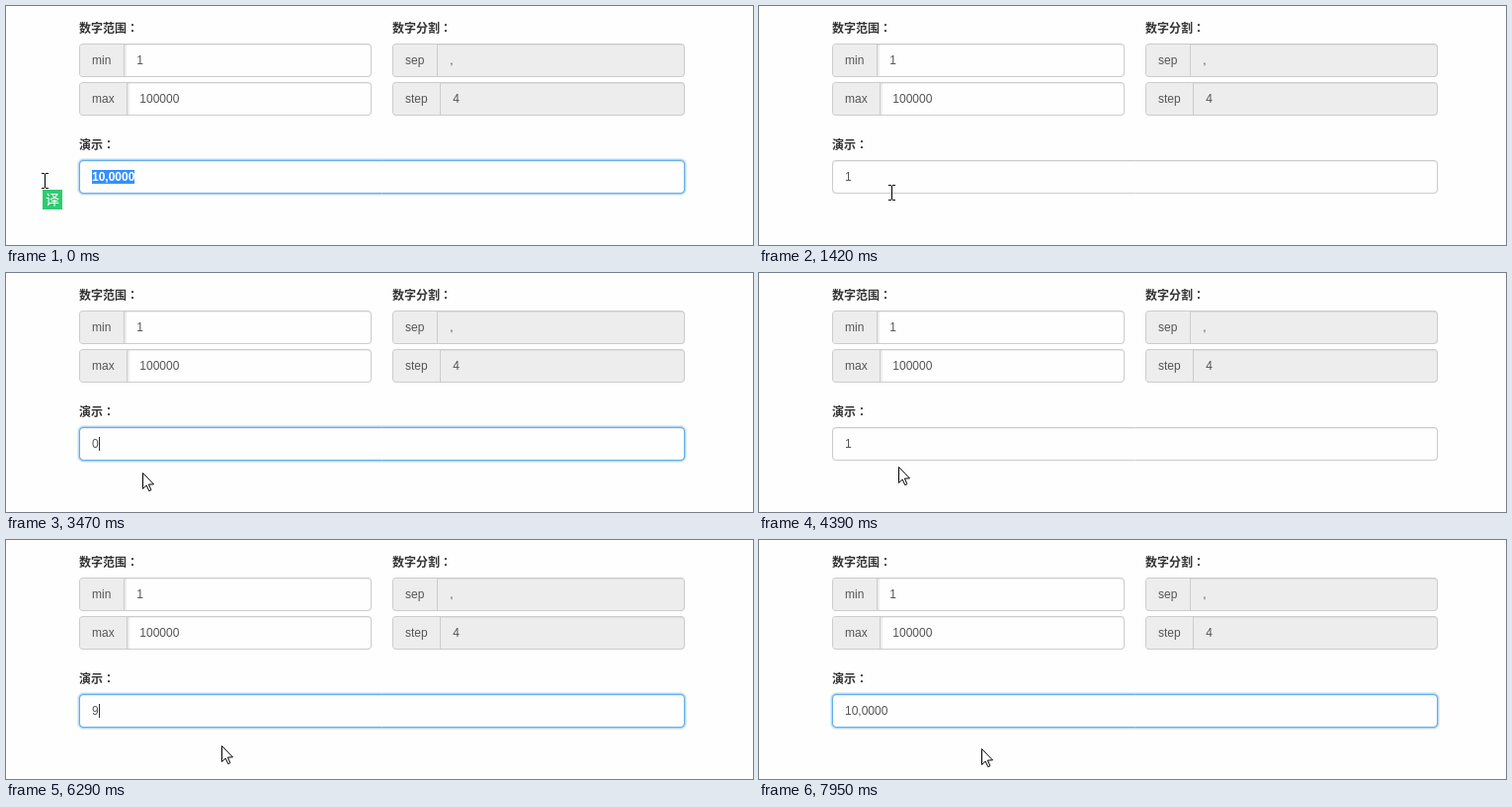
Write an HTML page with a canvas that moves like this. It is 756 px wide and 242 px high and loops after 8000 ms.

```html
<!DOCTYPE html>
<html lang="zh-CN">
<head>
<meta charset="utf-8">
<title>数字范围</title>
<style>
  html, body { margin: 0; width: 100%; height: 100%; overflow: hidden; background: #fefefe; }
  canvas { display: block; width: 756px; height: 242px; }
</style>
</head>
<body>
<canvas id="stage" width="756" height="242"></canvas>
<script>
const ctx = document.getElementById('stage').getContext('2d', { alpha: false });
const LOOP = 8000, TICK = 50, FADE = 110, BLINK = 530;
const MIN = 1, MAX = 100000, STEP = 4;
const SANS = '12px "Liberation Sans", Arial, sans-serif';
const CJK = '"Noto Sans CJK SC", "Noto Sans CJK", sans-serif';
const CJK_MID = '"Noto Sans CJK JP", "Noto Sans CJK", sans-serif';
const GREY = '#555', LINE = '#ccc', PANEL = '#ededed', PAPER = '#fefefe';
const FIELD = { x: 74, y: 156, w: 613, h: 34 };
const TEXT_X = 87;

// Pointer strokes: when each starts and ends, and where it leads
const strokes = [
  { from: 350, to: 630, x: 123, y: 200 },
  { from: 1300, to: 1620, x: 149, y: 174 },
  { from: 3350, to: 3470, x: 138, y: 202 },
  { from: 3530, to: 3530, x: 134, y: 205 },
  { from: 4390, to: 4530, x: 160, y: 167 },
  { from: 4830, to: 5000, x: 44, y: 168 },
  { from: 5430, to: 5540, x: 213, y: 203 },
  { from: 6290, to: 6290, x: 218, y: 208 },
  { from: 6940, to: 7000, x: 225, y: 211 }
];

// What the user does to the demo field
const actions = [
  [0, 'select'], [150, 'type', ''], [740, 'leave'],
  [1800, 'enter'], [2170, 'type', ''], [3040, 'type', '0'], [3720, 'leave'],
  [4830, 'enter'], [4940, 'select'], [5950, 'type', '9']
];
for (let i = 0; i < 6; i++) actions.push([6440 + 58 * i, 'type', '9'.repeat(3 + 2 * i)]);
actions.push([7950, 'leave']);

const clamp = (v, lo, hi) => Math.min(hi, Math.max(lo, v));

function format(value) {
  const digits = String(clamp(Number(value), MIN, MAX));
  return digits.replace(new RegExp(`\\B(?=(\\d{${STEP}})+$)`, 'g'), ',');
}

function fieldAt(t) {
  const s = { value: format(MAX), focused: true, turned: -LOOP, edited: 0, selected: false };
  for (const [at, action, value] of actions) {
    if (at > t) break;
    s.selected = action === 'select';
    s.edited = at;
    if (action === 'type') s.value = value;
    if (action === 'leave') s.value = format(s.value);
    if (action === 'leave' || action === 'enter') {
      s.focused = action === 'enter';
      s.turned = at;
    }
  }
  const p = clamp((t - s.turned) / FADE, 0, 1);
  s.ring = s.focused ? 1 - (1 - p) ** 2 : 1 - p * p;
  s.caret = s.focused && !s.selected && Math.floor((t - s.edited) / BLINK) % 2 === 0;
  return s;
}

function pointerAt(t) {
  let x = 39, y = 177;
  for (const s of strokes) {
    if (t < s.from) break;
    const n = Math.round((s.to - s.from) / TICK) + 1;
    const span = (s.to - s.from) / (n - 1) || 1;
    const part = Math.min(1, (1 + Math.floor((t - s.from) / span)) / n);
    x += (s.x - x) * part;
    y += (s.y - y) * part;
  }
  return [Math.round(x), Math.round(y)];
}

function text(str, x, y, color = GREY, font = SANS) {
  ctx.font = font;
  ctx.fillStyle = color;
  ctx.fillText(str, x, y);
}

function rect(x, y, w, h, color) {
  ctx.fillStyle = color;
  ctx.fillRect(x, y, w, h);
}

// One-pixel rounded outline, grown outwards by the given amount
function outline({ x, y, w, h }, color, grow = 0) {
  ctx.beginPath();
  ctx.roundRect(x + 0.5 - grow, y + 0.5 - grow, w - 1 + 2 * grow, h - 1 + 2 * grow, 3.5 + grow);
  ctx.strokeStyle = color;
  ctx.lineWidth = 1;
  ctx.stroke();
}

function panel(area, fill, stroke) {
  outline(area, stroke);
  ctx.fillStyle = fill;
  ctx.fill();
  outline(area, stroke);
}

function label(str, x, y) {
  text(str, x, y, '#333', 'bold 12px ' + CJK);
  text('：', x + 12 * str.length, y, '#333', 'bold 12px ' + CJK_MID);
}

function group(x, y, name, divider, value, fill) {
  panel({ x, y, w: 296, h: 34 }, fill, LINE);
  rect(x + 1, y + 2, divider - x, 30, PANEL);
  rect(x + 3, y + 1, divider - x, 32, PANEL);
  rect(divider, y + 1, x + 293 - divider, 1, 'rgba(0,0,0,.06)');
  rect(divider, y, 1, 34, LINE);
  text(name, x + 13, y + 21);
  text(value, divider + 13.3, y + 21);
}

function form() {
  rect(0, 0, 756, 242, PAPER);
  label('数字范围', 74, 27);
  label('数字分割', 391, 27);
  label('演示', 74, 145);
  group(74, 38, 'min', 119, MIN, PAPER);
  group(74, 77, 'max', 122, MAX, PAPER);
  group(391, 38, 'sep', 436, ',', PANEL);
  group(391, 77, 'step', 439, STEP, PANEL);
}

function demoField({ value, ring, selected, caret }) {
  const blue = alpha => `rgba(102,175,233,${alpha * ring})`;
  panel(FIELD, PAPER, LINE);
  outline(FIELD, blue(1));
  for (const grow of [1, 2]) outline(FIELD, blue(0.5 / grow ** 1.3), grow);
  rect(FIELD.x + 3, FIELD.y + 1, FIELD.w - 6, 1, 'rgba(0,0,0,.06)');

  ctx.font = SANS;
  const end = Math.round(TEXT_X + ctx.measureText(value).width);
  if (selected) {
    rect(TEXT_X, 166, end - TEXT_X, 14, '#3390ff');
    text(value, TEXT_X, 177, '#fff', 'bold ' + SANS);
  } else {
    text(value, TEXT_X, 177);
  }
  if (caret) rect(end, 166, 1, 14, '#333');
}

function translateButton() {
  rect(37, 186, 20, 20, '#2ecc71');
  text('译', 40, 201, '#fff', '14px ' + CJK);
}

function beam(x, y) {
  for (const edge of [y - 8, y + 7]) {
    rect(x - 3, edge, 3, 1, '#000');
    rect(x + 1, edge, 3, 1, '#000');
  }
  rect(x, y - 7, 1, 14, '#000');
}

function arrow(x, y) {
  const shape = [[0, 0], [0, 16], [3.7, 12.6], [6.3, 18.2], [8.4, 17.2], [5.9, 11.6], [11, 11.4]];
  ctx.beginPath();
  for (const [dx, dy] of shape) ctx.lineTo(x + dx + 0.5, y + dy + 0.5);
  ctx.closePath();
  ctx.fillStyle = '#fff';
  ctx.fill();
  ctx.strokeStyle = '#000';
  ctx.lineWidth = 1;
  ctx.stroke();
}

// The text beam also stays on while a drag runs past the left edge
function pointer(t) {
  const [x, y] = pointerAt(t);
  const overField = x < FIELD.x + FIELD.w && y >= FIELD.y && y < FIELD.y + FIELD.h;
  (overField ? beam : arrow)(x, y);
}

function draw(t) {
  const field = fieldAt(t);
  form();
  demoField(field);
  if (field.turned < 0) translateButton();
  pointer(t);
}

const begin = performance.now();
function tick() {
  draw((performance.now() - begin) % LOOP);
  requestAnimationFrame(tick);
}
tick();
</script>
</body>
</html>
```
